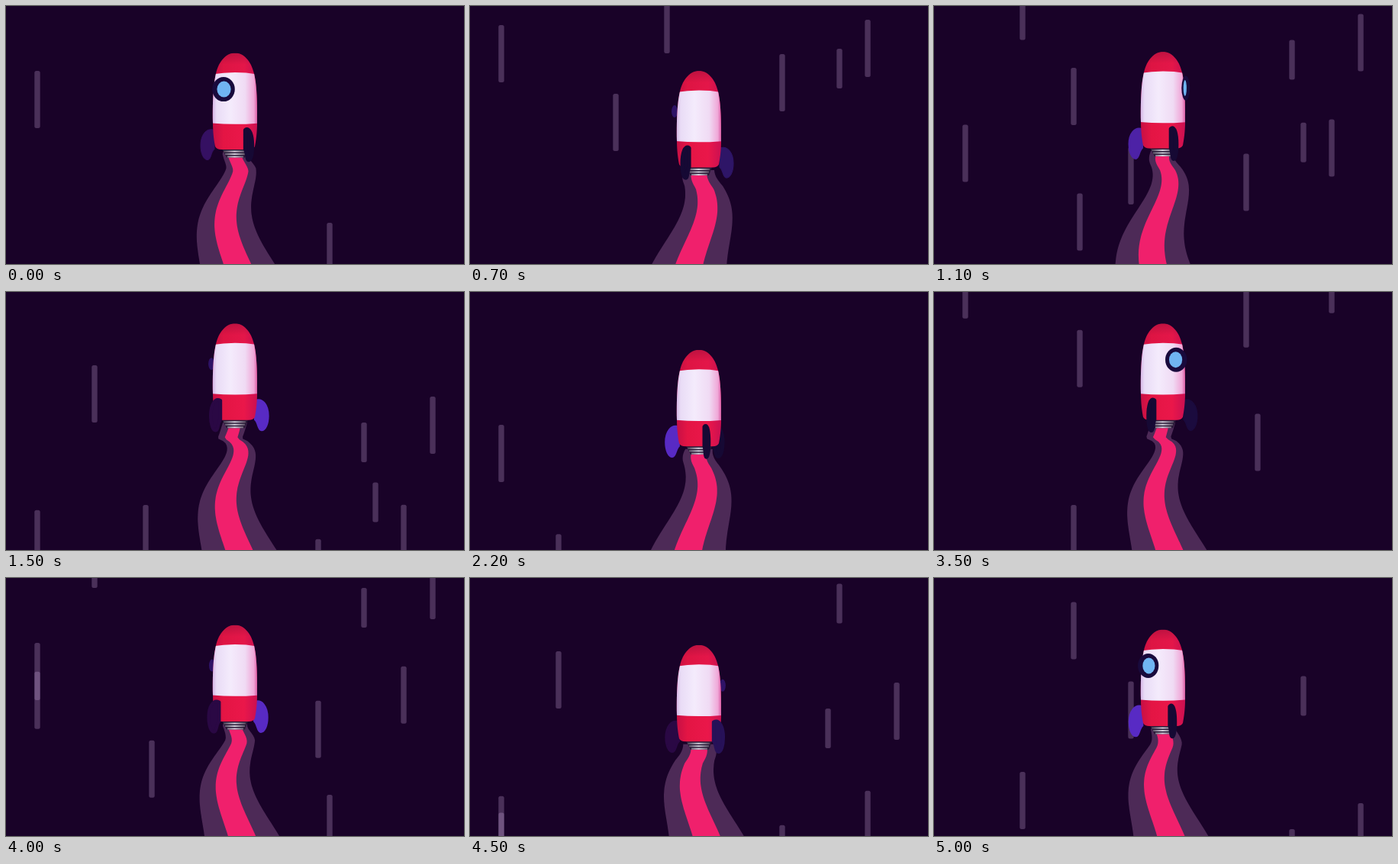
Write an HTML page that moves like this. It is 600x338 px and loops after 5100 ms.

```html
<!DOCTYPE html>
<html lang="en">
<head>
<meta charset="utf-8">
<title>Rocket</title>
<style>
html, body { margin: 0; width: 100%; height: 100%; overflow: hidden; background: #190228; }
svg { display: block; width: 600px; height: 338px; }
</style>
</head>
<body>
<svg viewBox="0 0 600 338" xmlns="http://www.w3.org/2000/svg">
  <defs>
    <linearGradient id="shell">
      <stop offset="0" stop-color="#d3b0e4"/>
      <stop offset=".1" stop-color="#e9dcf6"/>
      <stop offset=".4" stop-color="#f4ebfc"/>
      <stop offset=".72" stop-color="#f0dbf4"/>
      <stop offset=".91" stop-color="#f0a8d8"/>
      <stop offset="1" stop-color="#d64f9a"/>
    </linearGradient>
    <linearGradient id="red">
      <stop offset="0" stop-color="#c50f45"/>
      <stop offset=".25" stop-color="#e41544"/>
      <stop offset=".7" stop-color="#ea174a"/>
      <stop offset="1" stop-color="#c90f52"/>
    </linearGradient>
    <linearGradient id="metal">
      <stop offset="0" stop-color="#4c4358"/>
      <stop offset=".5" stop-color="#d5cfdc"/>
      <stop offset="1" stop-color="#574a60"/>
    </linearGradient>
    <linearGradient id="dusk" x1="0" y1="0" x2="0" y2="1">
      <stop offset="0" stop-color="#190228" stop-opacity=".2"/>
      <stop offset=".6" stop-color="#190228" stop-opacity=".03"/>
    </linearGradient>
    <clipPath id="hull">
      <path d="M0 0C11 0 21 10 25 27C28 40 29.5 58 29 92C29 104 27.5 115 26 122.500Q24 126.500 18 126.500L-18 126.500Q-24 126.500 -26 122.500C-27.500 115 -29 104 -29 92C-29.500 58 -28 40 -25 27C-21 10 -11 0 0 0Z"/>
    </clipPath>
  </defs>
  <rect width="600" height="338" fill="#190228"/>
  <g id="streaks" fill="#ecccff" fill-opacity=".23"></g>
  <path id="smoke" fill="#4d2a57"/>
  <path id="flame" fill="#f0206c"/>
  <g id="rocket">
    <g id="back"></g>
    <g>
      <path d="M-17 126H17L13 137H-11Z" fill="#2a1b38"/>
      <path d="M-15 128H14V130H-15ZM-13 131.500H13V133.500H-13ZM-10 135H11V137H-10Z" fill="url(#metal)"/>
    </g>
    <g clip-path="url(#hull)">
      <rect x="-30" y="0" width="60" height="128" fill="url(#red)"/>
      <path d="M-30 28Q0 23 30 28V92Q0 94.500 -30 92Z" fill="url(#shell)"/>
      <rect x="-30" y="0" width="60" height="25" fill="url(#dusk)"/>
    </g>
    <g id="front"></g>
  </g>
</svg>
<script>
const LOOP = 5100, STEP = 100;
const $ = id => document.getElementById(id);
const rad = d => d * Math.PI / 180;
const clamp = v => Math.max(0, Math.min(1, v));

function add(parent, tag, attrs) {
  const el = document.createElementNS('http://www.w3.org/2000/svg', tag);
  set(el, attrs);
  parent.appendChild(el);
  return el;
}
function set(el, attrs) {
  for (const k in attrs) el.setAttribute(k, attrs[k]);
}

// Streak families: period s, speed px/s, time of reference, [x, top at that time, length]
const families = [
  [3, 326, 0.7, [[41, 25, 75], [191, 115, 75], [409, 63, 75], [521, 18, 75]]],
  [3, 316, 1.5, [[116, 96, 75], [469, 171, 52], [559, 137, 75]]],
  [4, 242, 0.7, [[484, 56, 52]]],
  [4, 249, 0, [[424, 284, 75]]],
  [2, 495, 0.9, [[258, 86, 75], [183, -18, 75]]],
  [2, 445, 0, [[41, 85, 75]]]
];
const streaks = families.flatMap(([period, speed, at, lines]) =>
  lines.map(([x, top, h]) => ({
    period, speed,
    start: at - (top + 80) / speed,
    el: add($('streaks'), 'rect', { x: x - 3.7, width: 7.4, height: h, rx: 2.5 })
  })));

function drawStreaks(t) {
  for (const s of streaks) {
    const age = (((t - s.start) % s.period) + s.period) % s.period;
    s.el.setAttribute('y', (age * s.speed - 80).toFixed(1));
  }
}

// Ribbon that widens downwards while its waves stretch and run down
function ribbon(t, top, thin, mid, grow) {
  const left = [], right = [];
  for (let y = top; y <= 346; y += 3) {
    const age = Math.pow(Math.max(0, y - 192) / 84, 1 / 2.24);
    const amp = (6 + Math.max(0, y - 180) * 0.065) * Math.min(1, (y - top) / 20);
    const x = 300 - amp * Math.cos(2 * Math.PI * (age - t / 0.504));
    const w = Math.max(thin, mid + grow * (y - 215));
    left.push((x - w).toFixed(1) + ' ' + y.toFixed(1));
    right.unshift((x + w).toFixed(1) + ' ' + y.toFixed(1));
  }
  return 'M' + left.concat(right).join('L') + 'Z';
}

const fins = [60, 180, 300].map(offset => ({
  offset, el: add($('back'), 'path', { 'stroke-linejoin': 'round' })
}));
const port = add($('back'), 'g', {});
const ring = add(port, 'ellipse', {});
const glass = add(port, 'ellipse', { fill: '#70b5f2' });

function mix(a, b, k) {
  return 'rgb(' + a.map((v, i) => Math.round(v + (b[i] - v) * k)).join() + ')';
}

function drawFin(fin, spin) {
  const a = ((spin + fin.offset + 180) % 360 + 360) % 360 - 180;
  const s = Math.sin(rad(a)), c = Math.cos(rad(a));
  const p = (r, y) => (s * r).toFixed(1) + ' ' + y;
  const lit = a > 0 ? clamp((a - 40) / 20) * clamp((96 - a) / 14)
                    : clamp((-a - 87) / 13);
  const colour = mix(a < -35 ? [42, 8, 68] : [22, 9, 52], [88, 42, 196], lit);
  set(fin.el, {
    d: `M${p(27, 101)}C${p(38, 97)} ${p(45, 108)} ${p(45, 121)}` +
       `C${p(45, 132)} ${p(41, 140)} ${p(36, 140)}` +
       `C${p(31, 140)} ${p(32, 130)} ${p(27, 126)}Z`,
    fill: colour, stroke: colour,
    'stroke-width': (1 + 5 * Math.abs(c)).toFixed(1),
    display: c < -0.75 ? 'none' : 'inline'
  });
  $(c > 0.5 ? 'front' : 'back').appendChild(fin.el);
}

function drawPort(spin) {
  const s = Math.sin(rad(spin)), c = Math.cos(rad(spin));
  const seen = c > 0.05;
  const x = s * (seen ? 30 : 32);
  set(ring, {
    cx: x.toFixed(1), cy: seen ? 47.5 : 53,
    rx: (seen ? 4 + 12.5 * c : 4).toFixed(1), ry: seen ? 16 : 8,
    fill: seen ? '#190a3c' : '#2e1266'
  });
  set(glass, {
    cx: (x - s).toFixed(1), cy: 47.5,
    rx: (1 + 9.3 * Math.max(0, c)).toFixed(1), ry: 10.5,
    display: seen ? 'inline' : 'none'
  });
  $(seen ? 'front' : 'back').appendChild(port);
}

function draw(ms) {
  const t = Math.floor((ms % LOOP) / STEP) * STEP / 1000;
  const tip = 64.5 + 23.5 * Math.sin(Math.PI * (t - 0.04));
  const spin = 430 * t - 30;
  drawStreaks(t);
  $('smoke').setAttribute('d', ribbon(t, tip + 130, 16, 20, 0.236));
  $('flame').setAttribute('d', ribbon(t, tip + 134, 6, 10, 0.066));
  $('rocket').setAttribute('transform', `translate(300 ${tip.toFixed(1)})`);
  fins.forEach(f => drawFin(f, spin));
  drawPort(spin);
}

const begin = performance.now();
function tick() {
  draw(performance.now() - begin);
  requestAnimationFrame(tick);
}
tick();
</script>
</body>
</html>
```
